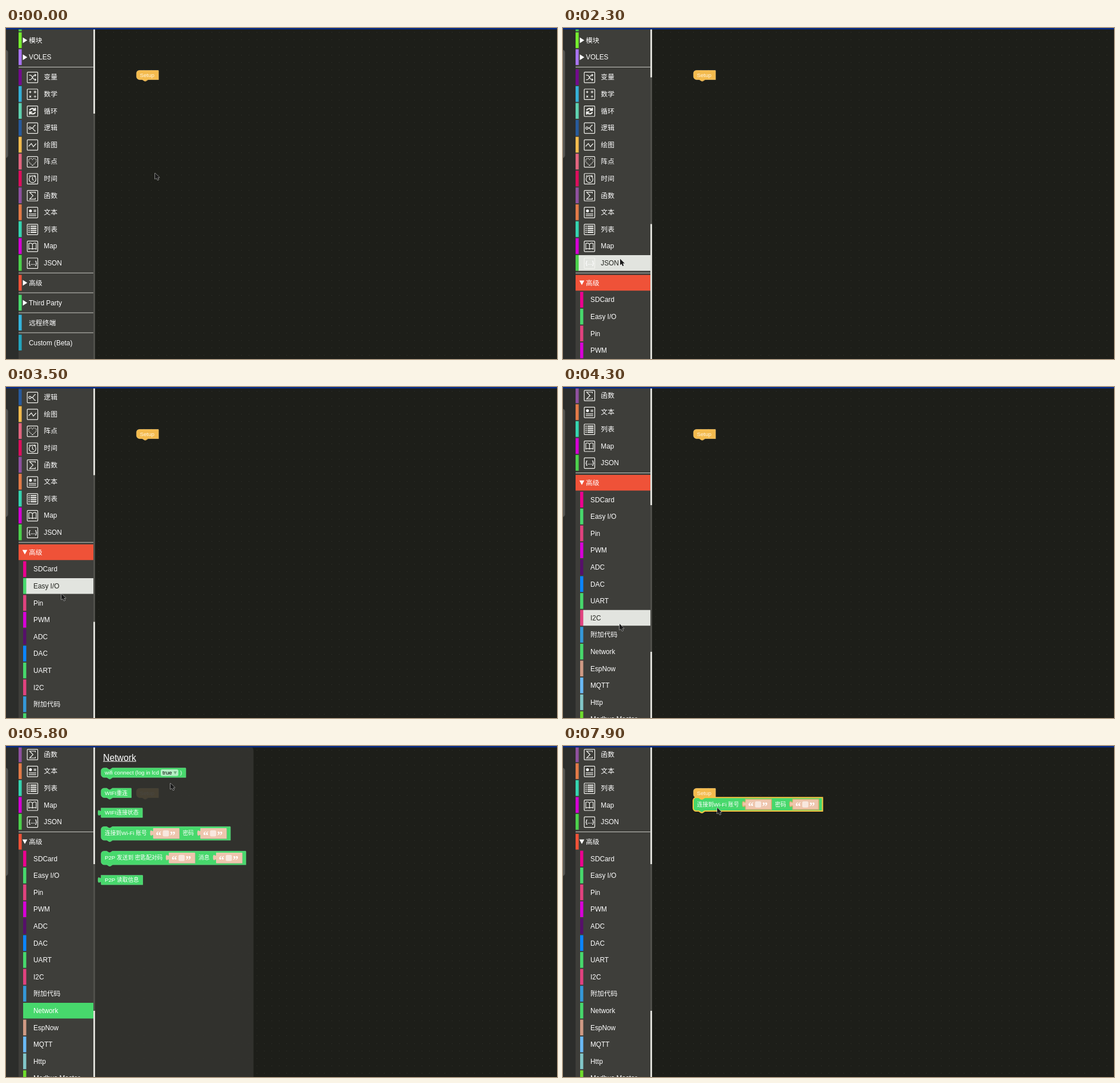
An HTML page with a canvas for the animation above (8 s loop, 965 by 580 pixels).

```html
<!DOCTYPE html>
<html lang="zh">
<head>
<meta charset="utf-8">
<style>
html, body { margin: 0; width: 100%; height: 100%; overflow: hidden; background: #1d1e19; }
canvas { display: block; }
</style>
</head>
<body>
<canvas id="stage" width="965" height="580"></canvas>
<script>
const ctx = document.getElementById('stage').getContext('2d');
const SANS = '"Liberation Sans", "Noto Sans CJK SC", "Noto Sans CJK", sans-serif';
const PITCH = 29.6, ROW_H = 27.6, LOOP = 8000;
const GREEN = '#47d86c', YELLOW = '#f4bb4e';

const ICONS = {
  变量: 'M-6-4h2q2 0 4 4t4 4h2M-6 4h2q2 0 4-4t4-4h2M4-6l2 2-2 2M4 2l2 2-2 2',
  数学: 'M-6-4h4M-4-6v4M2.5-5h4M2.5-3h4M-5.5 2.5l3 3M-2.5 2.5l-3 3M2.5 4h4M4.5 2v.8M4.5 5.3v.8',
  循环: 'M-5-1.5A5 4.5 0 0 1 4-2.5M5 1.5A5 4.5 0 0 1-4 2.5M5-6v4.5h-4.5M-5 6v-4.5h4.5',
  逻辑: 'M-6.5 0a2 2 0 1 0 4 0a2 2 0 1 0-4 0M-2.5 0H0L4-5M0 0L4 5M3.5-5h2M3.5 5h2',
  绘图: 'M-6.5 2L-2-2.5 1.5 3 6-2M-7 2h1.6M-2.8-2.5h1.6M.7 3h1.6M5.2-2h1.6',
  阵点: 'M0 6.5L-6.5 0V-4L-4-6H-2L0-4 2-6H4L6.5-4V0Z',
  时间: 'M-6 .7a6 6 0 1 0 12 0a6 6 0 1 0-12 0M0-3.5V1l2 2M-6-4l2-2M3-6.3l3 2.3',
  函数: 'M5-4V-6H-5L1 0-5 6H5V4',
  文本: 'M2-4h4.5M2-1.8h4.5M-6.5 2.5h13M-6.5 5.5h13',
  列表: 'M-3.5-5.5H7M-3.5-2H7M-3.5 1.5H7M-3.5 5H7M-7-5.5h2M-7-2h2M-7 1.5h2M-7 5h2',
  Map: 'M0-4q-3-3-6.5-1V5q3.5-2 6.5 0q3-2 6.5 0V-5q-3.5-2-6.5 1V5',
  JSON: ''
};

const basics = [
  ['变量', '#730a8e'], ['数学', '#35b0d8'], ['循环', '#5ed2b0'], ['逻辑', '#275a9c'],
  ['绘图', '#f4bb4e'], ['阵点', '#e2657f'], ['时间', '#dc0e5c'], ['函数', '#8f519f'],
  ['文本', '#e27a48'], ['列表', '#35d4b0'], ['Map', '#d400d4'], ['JSON', '#4cd14c']
];
const advanced = [
  ['SDCard', '#eb018f'], ['Easy I/O', GREEN], ['Pin', '#e0427f'], ['PWM', '#d800d8'],
  ['ADC', '#560f6a'], ['DAC', '#0a85ff'], ['UART', GREEN], ['I2C', '#e0427f'],
  ['附加代码', '#3498d8'], ['Network', GREEN], ['EspNow', '#d09a84'], ['MQTT', '#69b9f5'],
  ['Http', '#82c6c8'], ['Modbus Master', '#6edb2c']
];

// Keyframes: [time, values...], linear between entries
const pointer = [
  [0, 261, 254], [300, 261, 254], [800, 150, 252], [1200, 112, 236], [1400, 112, 236],
  [1500, 110, 327], [1700, 106, 420], [1900, 103, 447], [2100, 103, 447], [2500, 97, 362],
  [4100, 97, 362], [4200, 98, 390], [4300, 99, 415], [4600, 102, 457], [4800, 102, 460],
  [5200, 102, 460], [5300, 147, 447], [5400, 147, 447], [5500, 230, 240], [5600, 280, 109],
  [5700, 280, 109], [5800, 288, 65], [6000, 288, 65], [6400, 196, 152], [6500, 196, 152],
  [6600, 208, 152], [6700, 223, 151], [7000, 247, 126], [7300, 263, 107], [7800, 263, 107],
  [7900, 270, 108]
];
const scrolling = [
  [0, 0], [2600, 0], [2900, 36], [3000, 36], [3200, 95], [3500, 157], [3700, 157],
  [3900, 225], [4100, 278.8]
];
const dragging = [
  [0, 0, 0], [6500, 0, 0], [6600, 12, 0], [6700, 27.7, -1], [7000, 52, -26], [7300, 68, -44],
  [7500, 68, -44], [7600, 61.7, -50.7]
];
const hovering = [
  [0, ''], [800, '时间'], [1100, '阵点'], [1500, '列表'], [1600, 'JSON'], [1800, '高级'],
  [2200, 'JSON'], [2400, 'Map'], [2500, '列表'], [3300, 'JSON'], [3500, 'Easy I/O'],
  [4100, 'UART'], [4300, 'I2C'], [4400, '附加代码'], [4500, 'Network'], [5300, '']
];

function sample(keys, t) {
  const i = keys.findIndex(k => k[0] > t);
  if (i < 0) return keys[keys.length - 1].slice(1);
  const a = keys[i - 1], b = keys[i], u = (t - a[0]) / (b[0] - a[0]);
  return a.slice(1).map((v, n) => v + (b[n + 1] - v) * u);
}
const latest = (keys, t) => keys.filter(k => k[0] <= t).pop()[1];

function rect(x, y, w, h, color, r = 0) {
  ctx.fillStyle = color;
  ctx.beginPath();
  ctx.roundRect(x, y, w, h, r);
  ctx.fill();
}

function text(str, x, y, size = 11.85, color = '#fff', style = '') {
  ctx.font = `${style} ${size}px ${SANS}`;
  ctx.fillStyle = color;
  ctx.textBaseline = 'alphabetic';
  ctx.fillText(str, x, y + size * 0.36);
}

function icon(name, y) {
  ctx.save();
  ctx.translate(46.4, y + 0.4);
  ctx.strokeStyle = '#f4f4f0';
  ctx.lineWidth = 1.2;
  ctx.beginPath();
  ctx.roundRect(-9.2, -9.2, 18.4, 18.4, 1);
  ctx.stroke();
  if (name === '阵点') ctx.setLineDash([1.6, 1.3]);
  if (name === '循环' || name === '列表') ctx.lineWidth = 2.1;
  ctx.stroke(new Path2D(ICONS[name]));
  if (name === '文本') rect(-6, -5.5, 5, 5, '#fff', 2.5);
  if (name === 'JSON') text('{...}', -7.2, -0.6, 9.5, '#fff', 'bold');
  ctx.restore();
}

function separator(y) { rect(22, y - 0.5, 131, 1, '#c9c9c4'); }

function row(label, color, y, o = {}) {
  if (y < -16 || y > 596) return;
  const left = o.child ? 30 : 22, top = y - 13.9;
  if (o.selected) rect(left, top, 153 - left, ROW_H, color);
  else {
    if (o.hover) rect(left + 5, top, 126 - left + 22, ROW_H, '#e2e4df');
    rect(left, top, 5.5, ROW_H, color);
  }
  const ink = o.hover ? '#22231e' : '#fff';
  if (label in ICONS) icon(label, y);
  if (o.arrow) {
    ctx.fillStyle = ink;
    ctx.fill(new Path2D(o.arrow === 'open'
      ? `M28.7 ${y - 4}h8.6l-4.3 8z` : `M29.5 ${y - 5}l7.8 5-7.8 5z`));
  }
  text(label, label in ICONS ? 66.3 : o.child ? 48 : 40, y, 11.85, ink);
}

function toolbox(t) {
  const open = t >= 2100, scroll = sample(scrolling, t)[0];
  const hover = latest(hovering, t), network = t >= 5000 && t < 6600;
  const state = label => ({ hover: hover === label });
  rect(0, 0, 22, 580, '#2c2d2b');
  rect(-8, 38, 11.6, 190, '#565653', 5);
  rect(22, 0, 131, 580, '#3e3e3a');

  row('', '#4cd14c', -8 - scroll);
  row('模块', '#76ee2f', 21.5 - scroll, { arrow: 'closed' });
  row('VOLES', '#a974f2', 51.2 - scroll, { arrow: 'closed' });
  separator(68.6 - scroll);
  basics.forEach(([label, color], i) => row(label, color, 86.2 + i * PITCH - scroll, state(label)));

  const y = 446.6 - scroll;
  separator(y - 17.4);
  const selected = open && t < 5000;
  row('高级', '#ef5238', y, {
    arrow: open ? 'open' : 'closed', selected, hover: hover === '高级' && !selected
  });
  if (open) {
    advanced.forEach(([label, color], i) => row(label, color, y + (i + 1) * PITCH, {
      child: true, hover: hover === label, selected: network && label === 'Network'
    }));
  } else {
    [['Third Party', GREEN], ['远程终端', '#35b5dd'], ['Custom (Beta)', '#23a4bd']]
      .forEach(([label, color], i) => {
        const cy = y + (i + 1) * 34.9;
        separator(cy - 17.4);
        row(label, color, cy, { arrow: i ? '' : 'closed' });
      });
  }
  rect(153, 0, 3, 580, '#deded8');
  if (open) rect(153, 86.4 + scroll * 0.433, 3, 257, '#50504b');
  else rect(153, 150, 3, 430, '#50504b');
}

function workspace() {
  rect(0, 0, 965, 580, '#1d1e19');
  ctx.fillStyle = '#34352e';
  for (let y = 7; y < 580; y += 13.17)
    for (let x = 162; x < 965; x += 13.17) ctx.fillRect(Math.round(x), Math.round(y), 1, 1);
}

const TAB = 'c0 6.6-5.3-5.3-5.3 5s5.3-1.7 5.3 5';

function statement(x, y, w, h, notch = true) {
  const r = 5.3, dent = notch ? `H${x + 10}l4 2.6h2l4-2.6` : '';
  return `M${x} ${y + r}a${r} ${r} 0 0 1 ${r}-${r}${dent}H${x + w}v${h}H${x + 20}l-4 2.6h-2l-4-2.6` +
    `H${x + r}a${r} ${r} 0 0 1-${r}-${r}z`;
}
const reporter = (x, y, w, h) => `M${x} ${y}v3.3${TAB}V${y + h}h${w}v-${h}z`;

function block(d, color, outline) {
  const path = new Path2D(d);
  ctx.save();
  ctx.translate(0.7, 0.7);
  ctx.fillStyle = color;
  ctx.fill(path);
  ctx.fillStyle = 'rgba(0,0,0,.22)';
  ctx.fill(path);
  ctx.restore();
  ctx.fillStyle = color;
  ctx.fill(path);
  ctx.strokeStyle = outline || 'rgba(255,255,255,.25)';
  ctx.lineWidth = outline ? 2 : 0.6;
  ctx.stroke(path);
}

const caption = (str, x, y) => text(str, x, y, 9.7);

function quoteInput(x, y, dim, edge) {
  block(reporter(x, y, 45.5, 18), dim ? '#c2a18b' : '#eec5ad', edge);
  ctx.font = 'bold 20px "Liberation Serif", serif';
  ctx.fillStyle = dim ? '#eee' : '#fff';
  ctx.fillText('“', x + 4.5, y + 20);
  ctx.fillText('”', x + 29, y + 20);
  rect(x + 16.8, y + 3.7, 10.8, 10.8, dim ? '#e6dcd4' : '#f8e7de', 2.5);
}

function connectBlock(dx, dy, selected, dim) {
  const x = 166.3 + dx, y = 141 + dy;
  const edge = selected && (dim ? '#ccb140' : '#f9c440');
  block(statement(x, y, 226.5, 23.8), dim ? '#3bb35b' : GREEN, edge);
  caption('连接到Wi-Fi 账号', x + 6.7, y + 12);
  quoteInput(x + 91.5, y + 3, dim, selected && 'rgba(220,175,90,.55)');
  caption('密码', x + 143.2, y + 12);
  quoteInput(x + 174.2, y + 3, dim, selected && 'rgba(220,175,90,.55)');
}

function setupBlock() {
  block(statement(228.3, 74, 38.6, 16.2, false), YELLOW);
  text('Setup', 234.5, 82.3, 9.7, '#fff5e0');
}

function flyout(selected) {
  rect(156, 0, 277.5, 580, 'rgba(51,52,48,.9)', [0, 8, 0, 0]);
  text('Network', 170, 20, 15.8);
  rect(170, 26.5, 58, 1.1, '#fff');

  block(statement(166.3, 38.3, 148.4, 16.6), GREEN);
  caption('wifi connect (log in lcd', 173, 46.6);
  rect(271, 41, 30.8, 11.5, '#b5efc4', 2.5);
  text('true', 274, 46.6, 9.7, '#000');
  ctx.fillStyle = '#6fae80';
  ctx.fill(new Path2D('M293.5 44.5h5.6l-2.8 5.2z'));
  caption(')', 305, 46.6);

  block(statement(166.3, 73.8, 53, 16.4), GREEN);
  caption('WIFI重连', 173, 82.3);
  block(reporter(166.3, 108.6, 72.5, 16.4), GREEN);
  caption('WIFI连接状态', 173, 117);
  connectBlock(0, 0, selected, false);

  block(statement(166.3, 184, 253.6, 23.8), GREEN);
  caption('P2P 发送到 密匙配对码', 173, 195.6);
  quoteInput(285.3, 187, false);
  caption('消息', 337, 195.6);
  quoteInput(368, 187, false);
  block(reporter(166.3, 226.3, 73, 16.4), GREEN);
  caption('P2P 读取信息', 173, 234.7);
}

function cursor(t) {
  const [x, y] = sample(pointer, t), hand = t >= 6500 && t < 7900;
  ctx.save();
  ctx.translate(x, y);
  ctx.lineJoin = 'round';
  ctx.lineWidth = 1;
  const shape = new Path2D(hand
    ? 'M-3.5 0q-1.5-1-1 1l2.5 4h5.5q1.5-3 1.2-6-.7-1.5-1.7-.6-.8-1.5-1.8-.4-1-1.3-2 0-1.3-1-1.5.6v2z'
    : 'M0 0v11l2.6-2.3 1.8 4 2-.9-1.8-3.9h3.5z');
  ctx.fillStyle = hand ? '#fff' : '#1b1b1b';
  ctx.strokeStyle = hand ? '#333' : '#f2f2f2';
  ctx.lineWidth = hand ? 0.6 : 1;
  ctx.stroke(shape);
  ctx.fill(shape);
  ctx.restore();
}

function draw(t) {
  workspace();
  setupBlock();
  if (t >= 6600) connectBlock(...sample(dragging, t), true, t < 7600);
  if (t >= 5000 && t < 6600) flyout(t >= 6400);
  toolbox(t);
  rect(0, 0, 965, 2.6, '#062b86');
  cursor(t);
}

function tick() {
  draw(Math.floor(performance.now() % LOOP / 100) * 100);
  requestAnimationFrame(tick);
}
tick();
</script>
</body>
</html>
```
